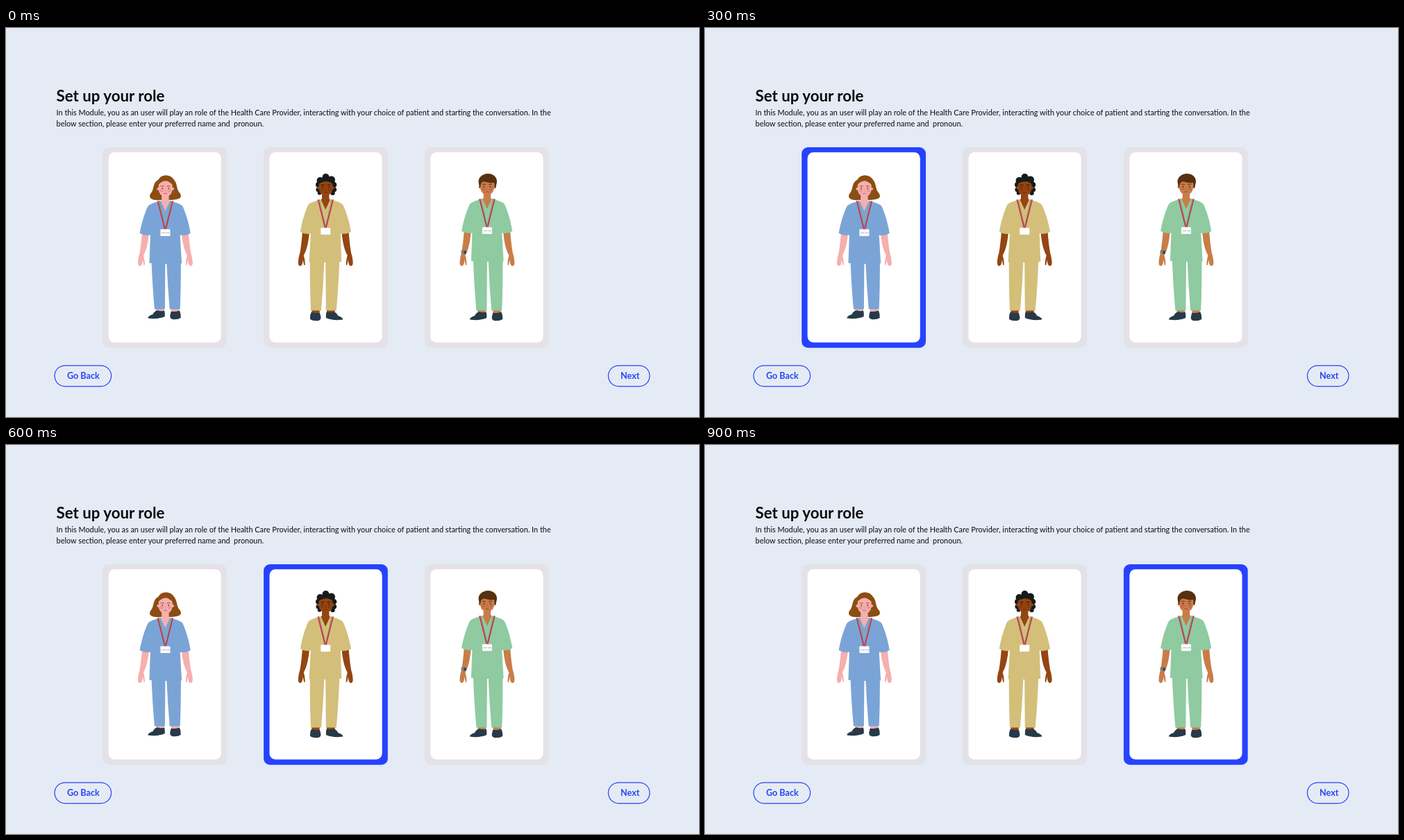
These frames come from a looping animation (998 by 561 pixels, 1200 ms). An HTML page:

```html
<!DOCTYPE html>
<html lang="en">
<head>
<meta charset="utf-8">
<title>Set up your role</title>
<style>
  html, body { margin: 0; width: 100%; height: 100%; overflow: hidden; background: #e4ebf5; }
  svg { display: block; width: 100vw; height: 100vh; }
  text { font-family: Lato, "Open Sans", sans-serif; white-space: pre; }
  .title { font-size: 22.25px; font-weight: 700; fill: #0b0b0d; }
  .body { font-size: 10.89px; fill: #0b0b0d; }
  .button { fill: none; stroke: #2944f5; stroke-width: 1.2; }
  .label { font-size: 12.6px; font-weight: 700; fill: #2944f5; }
  .tag { font-size: 2.5px; fill: #333; text-anchor: middle; }
</style>
</head>
<body>
<svg id="stage" viewBox="0 0 998 561">
  <text class="title" x="72.6" y="106">Set up your role</text>
  <text class="body" x="72.6" y="126">In this Module, you as an user will play an role of the Health Care Provider, interacting with your choice of patient and starting the conversation. In the</text>
  <text class="body" x="72.6" y="141.6">below section, please enter your preferred name and  pronoun.</text>
  <g id="cards"></g>
  <rect class="button" x="70" y="486.8" width="81.6" height="30" rx="15"/>
  <text class="label" x="88" y="506.2">Go Back</text>
  <rect class="button" x="867.4" y="486.8" width="59.6" height="30" rx="15"/>
  <text class="label" x="885" y="506.2">Next</text>
</svg>
<script>
const IDLE = '#e4e1e7', PICKED = '#2742ff', LOOP = 1200;

const path = (d, fill, extra = '') => `<path d="${d}" fill="${fill}" ${extra}/>`;
const line = (d, stroke, width) => path(d, 'none', `stroke="${stroke}" stroke-width="${width}" stroke-linecap="round"`);
const dot = (x, y, r, fill, extra = '') => `<circle cx="${x}" cy="${y}" r="${r}" fill="${fill}" ${extra}/>`;
const move = (x, y, inner, flip = 1) => `<g transform="translate(${x} ${y}) scale(${flip} 1)">${inner}</g>`;

// Body parts are drawn around x = 0; y is the stage height.
const ARM = 'M-33 290 L-23 290 C-24 308 -27 320 -31.5 328 C-30 333 -29.3 338 -29.6 342 L-31 342 L-32.6 334 C-32.6 339 -34 343 -36.5 343.2 Q-39.8 343 -39.4 337 Q-38.6 329 -37 325 Q-34.5 311 -33 290Z';
const SHIRT = 'M-7 248.7 C-13 251.5 -21 252.5 -25 257 C-29 265 -34 280 -36.8 296 C-31 299 -26 299.5 -21.5 298.5 L-23 339 Q0 341 23.7 339.5 L21.3 298.5 C27 300 32 298.5 36.3 296 C34 280 29 266 25 257 C21 252.5 13 251.5 7 248.7 L0 264Z';
const LEGS = 'M-20 334 L0 334 L-.5 405.5 L-15.5 405.5 Q-18.6 372 -20 334Z M2 340 L2 334 L22.5 334 Q22.6 372 21.3 405.5 L6.3 405.5 Q3.4 372 2 340Z';
const SHOES = 'M-25 418.5 Q-25.4 415.5 -18 413 Q-15 407.5 -11 407.3 Q-5 409 -1.4 407.5 Q-.2 411 -.6 416 Q-4 417.8 -8 418.2 Q-15 420.3 -25 418.5Z M8.3 408.5 Q13 410 20.5 407.5 Q22.8 412 22.3 418 Q18 421 11 420.2 Q6.4 419.5 6.8 415Z';
const FACE = 'M-10 -6 Q0 -14 10 -6 L9.8 4 Q8 12.5 0 12.5 Q-8 12.5 -9.8 4Z';

function lanyard(y, tag) {
  const stripes = [['#5c8b72', 1.2, .8], ['#d9a647', .4, .9], ['#c22f55', -.7, 1.7]];
  const straps = [-1, 1].map(side => stripes.map(([color, inset, width]) =>
    line(`M${side * (10 - inset)} ${y} L${side * (.3 - inset / 2)} ${y + 40}`, color, width)).join('')).join('');
  return straps +
    `<rect x="-7" y="${y + 40.3}" width="14" height="9.6" rx=".7" fill="#fff" stroke="#dcdce0" stroke-width=".3"/>` +
    (tag ? `<text class="tag" x="0" y="${y + 46}">${tag}</text>` : '');
}

function head(p) {
  const ears = dot(-10.3, 1.5, 2.1, p.skin) + dot(10.3, 1.5, 2.1, p.skin);
  const cheeks = [-5.5, 5.5].map(x => dot(x, 3.8, 2.6, p.blush, 'opacity=".55"')).join('');
  const features = [-4.5, 4.5].map(x =>
    dot(x, .5, .85, '#24150f') + line(`M${x - 2.2} -2.3 Q${x} -3.5 ${x + 2.2} -2.4`, p.brow, .9)).join('') +
    line('M0 1 L-.8 4.8 L.7 5', p.blush, .6) + line('M-2 8.3 Q0 7.5 2 8.3', p.lip, .9);
  return ears + path(FACE, p.skin) + cheeks + features + p.fringe;
}

function person(p) {
  const arm = path(ARM, p.skin);
  const ankles = path('M-14 403 L-1.5 403 L-2 410 L-13 410Z M8 403 L20 403 L19.5 410 L9 410Z', p.skin);
  const legs = move(0, p.legDrop, ankles + path(LEGS, p.cloth) + path(SHOES, '#263a49'));
  const body = legs + arm + move(0, 0, arm, -1);
  const neck = move(0, -p.rise, path('M-5 236 L5 236 L5.3 248 L8 252 L0 266 L-8 252 L-5.3 248Z', p.skin));
  const shirt = move(0, -p.rise, path(SHIRT, p.cloth), p.flip);
  const watch = p.watch ? `<g transform="rotate(12 -33.7 323)"><rect x="-37" y="321" width="7" height="4.2" fill="#33434f"/>${dot(-35.3, 323, 2.3, '#6f8794')}</g>` : '';
  return move(p.x, 0,
    move(0, 0, body, p.flip) + watch +
    move(p.headX, p.headY, p.back) + neck + shirt +
    lanyard(250 - p.rise, p.tag) +
    move(p.headX, p.headY, head(p)));
}

const curls = [[-8, -9, 5], [0, -14, 5], [8, -10, 5.5], [11.5, -3, 4.3], [12, 4, 3.6], [10, 9, 3.2], [-10.5, -3, 4], [-10.5, 4, 3.6], [-9, 9, 2.8]]
  .map(c => dot(...c, '#171b1c')).join('') + dot(0, -2, 12, '#171b1c');

const people = [
  {
    x: 229.4, headX: .3, headY: 230.5, flip: 1, rise: 0, legDrop: 0, tag: 'Name Here',
    skin: '#f5afae', cloth: '#7ba4d6', blush: '#ea8082', brow: '#8b4a10', lip: '#b94b50',
    back: path('M-10 -12 C-6 -20 7 -20 12 -12 C18 -5 15 2 21 8 C25 15 19 17 7 17.5 L-7 17.5 C-18 18.5 -25 16 -22 9 C-15 2 -20 -6 -10 -12Z', '#8c4d12'),
    fringe: path('M-11 -2 C-10 -7 -4 -9 1 -11.5 C4 -8 10 -7 11 -2 L13 -10 Q1 -20 -11 -11Z', '#8c4d12')
  },
  {
    x: 460.2, headX: .3, headY: 229, flip: -1, rise: 2, legDrop: 2, tag: '',
    skin: '#944511', cloth: '#d3bf7a', blush: '#7d340c', brow: '#20130d', lip: '#5f220e',
    back: curls,
    fringe: path('M-11 -1 Q-10 -6 -5 -6.5 Q0 -8.5 5 -7 Q10 -6 11 0 L12 -9 L4 -14 L-9 -11Z', '#171b1c')
  },
  {
    x: 692.9, headX: .1, headY: 228, flip: 1, rise: 3, legDrop: 2, tag: 'Name Here', watch: true,
    skin: '#c87d49', cloth: '#8fcaa1', blush: '#bd6042', brow: '#4d270f', lip: '#96482e',
    back: '',
    fringe: path('M-11 3 L-12.5 -6 C-13 -13 -6 -18 1 -18 C9 -18 14.3 -13 14 -6 L12 3.5 L10.3 1 L10 -5 C5 -3.5 0 -6 -5 -6.5 C-8 -6 -9 -4 -9.5 0Z', '#57300f')
  }
];

const cards = document.getElementById('cards');
cards.innerHTML = people.map((p, i) => {
  const x = 139.2 + i * 231.85;
  return `<rect class="frame" x="${x}" y="172" width="178.8" height="289.2" rx="9" fill="${IDLE}"/>
    <rect x="${x + 8.4}" y="179.2" width="162.2" height="274.2" rx="8.5" fill="#fff"/>${person(p)}`;
}).join('');

// Each card is highlighted for one quarter of the loop, after a quarter with none.
cards.querySelectorAll('.frame').forEach((frame, i) => {
  const steps = [[0, IDLE], [(i + 1) / 4, PICKED], [(i + 2) / 4, IDLE], [1, IDLE]];
  frame.animate(
    steps.map(([offset, fill]) => ({ offset, fill, easing: 'steps(1, end)' })),
    { duration: LOOP, iterations: Infinity }
  ).startTime = 0;
});
</script>
</body>
</html>
```
